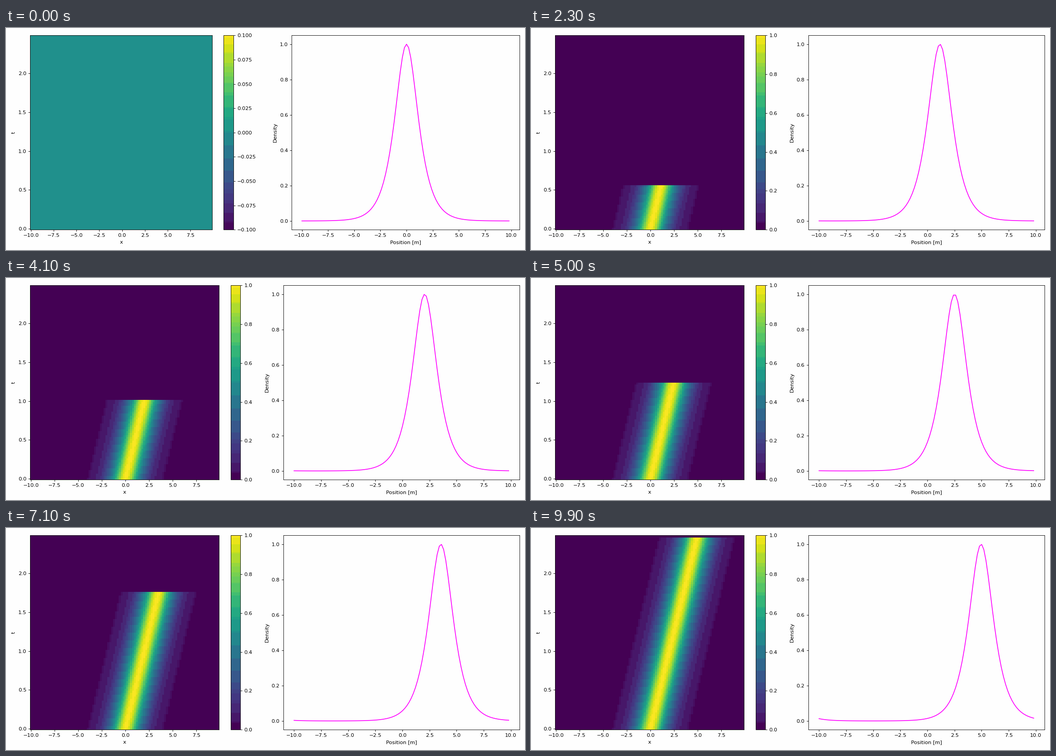
Animation of 1143 by 490 pixels, one loop 10000 ms. Source, as a matplotlib script:

```python
import matplotlib.pyplot as plt
import numpy as np
from matplotlib.animation import FuncAnimation
from matplotlib.colors import ListedColormap

# A 14 inch wide figure; the tiny extra keeps the pixel size from truncating down
WIDTH, HEIGHT = 1143 + 1e-6, 490 + 1e-6
DPI = 1143 / 14
STEPS = 100
PERIOD = 20
SPEED = 2
COLUMN_PAD = 2.2
PAPER = "#fefefe"

x = -10 + 0.2 * np.arange(100)
t = 0.025 * np.arange(STEPS)

# Soliton travelling through a periodic domain, one row per time step
offset = (x[None, :] - SPEED * t[:, None] + PERIOD / 2) % PERIOD - PERIOD / 2
density = 1 / np.cosh(offset)


def banded_viridis(values):
    """Viridis merged into coarse colour bands, weighted by how often each shade occurs."""
    shades = plt.get_cmap("viridis")(np.arange(256), bytes=True)[:, :3].astype(int)
    index = np.clip((values * 256).astype(int), 0, 255)
    weights = 2 + np.bincount(index.ravel(), minlength=256)
    bands = (shades[:, 0] // 32) * 256 + (shades[:, 1] // 16) * 16 + shades[:, 2] // 32
    merged = np.empty((256, 3))
    for band in np.unique(bands):
        same = bands == band
        merged[same] = np.floor(np.average(shades[same], axis=0, weights=weights[same]))
    return ListedColormap(merged / 255)


def recorded(step):
    """Rows before the given step hold data, later ones are still zero."""
    return np.where(np.arange(STEPS)[:, None] < step, density, 0)


BLANK = (banded_viridis(np.full((STEPS, x.size), 0.5)), (-0.1, 0.1))
RUNNING = (banded_viridis(recorded(STEPS // 2)), (0, 1))

fig, (ax_map, ax_line) = plt.subplots(
    1, 2, figsize=(WIDTH / DPI, HEIGHT / DPI), dpi=DPI, facecolor=PAPER
)

mesh = ax_map.pcolormesh(
    x, t, recorded(0), cmap=BLANK[0], vmin=-0.1, vmax=0.1, shading="nearest"
)
fig.colorbar(mesh, ax=ax_map)
ax_map.set(xlabel="x", ylabel="t")

(line,) = ax_line.plot(x, density[0], color="magenta")
ax_line.set(xlabel="Position [m]", ylabel="Density", facecolor=PAPER)
ax_line.set_xlim(ax_line.get_xlim())
ax_line.set_ylim(ax_line.get_ylim())
fig.tight_layout(w_pad=COLUMN_PAD)


def update(step):
    cmap, limits = RUNNING if step else BLANK
    mesh.set_array(recorded(step))
    if mesh.get_clim() != limits:
        mesh.set_cmap(cmap)
        mesh.set_clim(*limits)
        fig.tight_layout(w_pad=COLUMN_PAD)
    line.set_ydata(density[step])
    return mesh, line


anim = FuncAnimation(fig, update, frames=STEPS, interval=100, repeat=True, repeat_delay=0)
plt.show()
```
